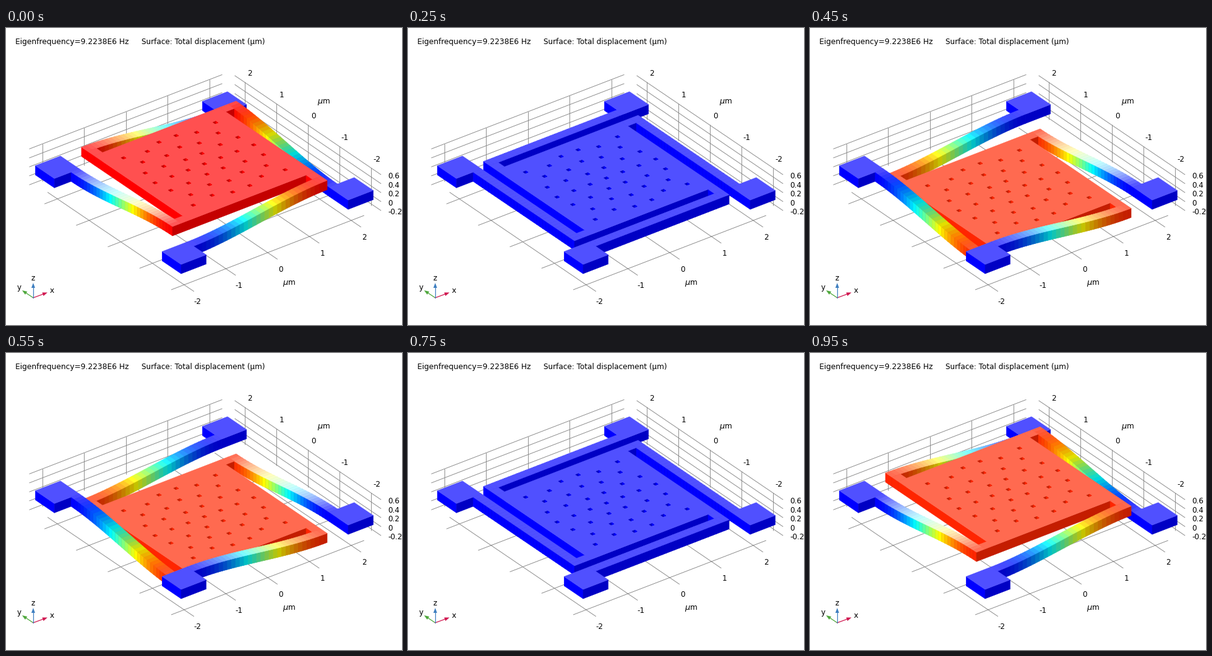
Animation, 640 px wide and 480 px high, one loop 1000 ms. Source, as a matplotlib script:

```python
import numpy as np
import matplotlib.pyplot as plt
from matplotlib.animation import FuncAnimation
from matplotlib.collections import LineCollection, PolyCollection

FRAMES, INTERVAL = 20, 50
THICK, LIFT = 15, 23          # plate thickness and peak displacement, px
TOP_Z = 0.31                  # z value of the undeformed top surface
STRIPS = 32
LOW, HIGH = -1.7, 1.5         # beam runs from its anchor to the far link

plt.rcParams["font.family"] = "DejaVu Sans"
fig = plt.figure(figsize=(6.4, 4.8), dpi=100, facecolor="white")
ax = fig.add_axes([0, 0, 1, 1])
ax.set_xlim(0, 640)
ax.set_ylim(480, 0)
ax.axis("off")


def project(x, y, up=0):
    return 320.5 + 67.5 * x - 51.2 * y, 242.5 - 26 * x - 34.7 * y - up


def label(x, y, text, size=12, **kw):
    ax.text(x, y, text, fontsize=size * 0.72, color="black", **kw)


def draw_grid():
    def segment(a, b, z_a, z_b):
        return [project(*a, 72.5 * (z_a - TOP_Z)), project(*b, 72.5 * (z_b - TOP_Z))]

    end, wall, floor = 2.31, 2.48, -0.395
    lines = []
    for k in range(-2, 3):
        z = 0.2 + 0.2 * k
        lines += [
            segment((-end, wall), (end, wall), z, z),
            segment((wall, -end), (wall, end), z, z),
            segment((k, wall), (k, wall), 0.61, -0.23),
            segment((wall, k), (wall, k), 0.61, -0.23),
            segment((-end, k), (end, k), floor, floor),
            segment((k, -end), (k, end), floor, floor),
        ]
    ax.add_collection(LineCollection(lines, colors="#858585", linewidths=0.65, zorder=1))


def draw_labels():
    label(15, 26, "Eigenfrequency=9.2238E6 Hz", 12.2)
    label(219, 26, "Surface: Total displacement (µm)")
    mid = dict(ha="center", va="center_baseline")
    for k in range(-2, 3):
        label(444 + 67.4 * k, 389 - 26 * k, str(k), **mid)
        label(496.5 - 51.2 * k, 141.5 - 34.8 * k, str(k), **mid)
        z = "0" if k == -1 else f"{0.2 + 0.2 * k:.1f}"
        label(617, 267.3 - 14.5 * k, z, va="center_baseline")
    for x, y in [(503, 122), (447, 415)]:
        label(x, y, "μ", 13, style="italic")
        label(x + 9, y, "m")


def draw_triad():
    origin = np.array([44.0, 436.0])
    for name, tip, spot, color in [("y", (26, 424), (21, 418), "#4fa83d"),
                                   ("x", (67, 427.5), (74, 423), "#d01850"),
                                   ("z", (44, 412), (44, 403), "#3f7fc0")]:
        tip = np.array(tip)
        along = (tip - origin) / np.hypot(*(tip - origin))
        side = np.array([-along[1], along[0]]) * 3
        base = tip - 8 * along
        ax.plot(*zip(origin, base), color=color, lw=0.9)
        ax.fill(*zip(tip, base + side, base - side), color=color, lw=0)
        label(*spot, name, ha="center", va="center_baseline")


def rainbow(v):
    v = 3 * abs(v)
    return np.clip([v - 1, min(v, 3 - v), 2 - v], 0, 1)


def top_shade(color, gloss):
    if gloss < 0:
        return color * (1 + gloss)
    return color + (1 - color) * min(gloss, 0.85)


class Scene:
    """Collects faces from back to front for one vibration amplitude."""

    def __init__(self, amp):
        self.amp, self.verts, self.colors = amp, [], []

    def add(self, verts, color):
        self.verts.append(verts)
        self.colors.append(color)

    def box(self, x0, x1, y0, y1, shape):
        def corner(x, y):
            return project(x, y, LIFT * self.amp * shape(x, y))

        def wall(a, b, light):
            drop = [(x, y + THICK) for x, y in (b, a)]
            self.add([a, b] + drop, light)

        xm, ym = (x0 + x1) / 2, (y0 + y1) / 2
        left, back = corner(x0, y1), corner(x1, y1)
        right, front = corner(x1, y0), corner(x0, y0)
        wall(left, front, rainbow(self.amp * shape(x0, ym)))
        wall(front, right, 0.77 * rainbow(self.amp * shape(xm, y0)))
        rise = self.amp * LIFT / 72.5
        tilt_x = rise * (shape(x0, ym) - shape(x1, ym)) / (x1 - x0)
        tilt_y = rise * (shape(xm, y0) - shape(xm, y1)) / (y1 - y0)
        gloss = 0.314 + 1.3 * tilt_x + 3.3 * tilt_y
        self.add([left, back, right, front],
                 top_shade(rainbow(self.amp * shape(xm, ym)), gloss))

    def anchor(self, sx, sy):
        x, y = 2 * sx, 2 * sy
        self.box(x - 0.3, x + 0.3, y - 0.3, y + 0.3, lambda x, y: 0)

    def solid(self, x0, x1, y0, y1):
        self.box(x0, x1, y0, y1, lambda x, y: 1)

    def beam(self, axis, sign):
        """Beam along an axis, rising in the direction given by sign."""
        def shape(x, y):
            s = (sign * (x, y)[axis] - LOW) / (HIGH - LOW)
            return s * s * (3 - 2 * s)

        cuts = np.sort(sign * np.linspace(LOW, HIGH, STRIPS + 1))[::-1]
        across = sign if axis else -sign
        near, far = sorted((1.7 * across, 1.9 * across))
        for hi, lo in zip(cuts, cuts[1:]):
            span = (near, far, lo, hi) if axis else (lo, hi, near, far)
            self.box(*span, shape)

    def hole(self, x, y, half=0.034):
        up = LIFT * self.amp
        left, back, right, front = [project(x + i * half, y + j * half, up)
                                    for i, j in [(-1, 1), (1, 1), (1, -1), (-1, -1)]]
        color = rainbow(self.amp)
        self.add([left, back, right, front], 0.77 * color)
        share = (back[0] - front[0]) / (right[0] - front[0])
        below = (back[0], front[1] + share * (right[1] - front[1]))
        self.add([back, right, below], color)


def hole_centres():
    spots = [(i, j) for i in (-1.1, 1.1) for j in (-1.1, 1.1)] + [(0, 0)]
    for radius, count in [(0.39, 6), (0.78, 12), (1.18, 18)]:
        for a in 2 * np.pi * np.arange(count) / count:
            spots.append((radius * np.cos(a), radius * np.sin(a)))
    return spots


HOLES = hole_centres()


def build(amp):
    s = Scene(amp)
    s.anchor(1, 1)
    s.beam(0, -1)
    s.solid(-1.5, -1.3, 1.5, 1.7)
    s.beam(1, 1)
    s.anchor(1, -1)
    s.solid(1.5, 1.7, 1.3, 1.5)
    s.solid(-1.5, 1.5, -1.5, 1.5)
    for x, y in HOLES:
        s.hole(x, y)
    s.solid(-1.7, -1.5, -1.5, -1.3)
    s.solid(1.3, 1.5, -1.7, -1.5)
    s.anchor(-1, 1)
    s.beam(1, -1)
    s.beam(0, 1)
    s.anchor(-1, -1)
    return s


draw_grid()
draw_labels()
draw_triad()
model = PolyCollection([], linewidths=0.4, zorder=3)
ax.add_collection(model, autolim=False)


def update(i):
    scene = build(np.cos(2 * np.pi * i / FRAMES))
    model.set_verts(scene.verts)
    model.set_facecolor(scene.colors)
    model.set_edgecolor(scene.colors)
    return [model]


anim = FuncAnimation(fig, update, frames=FRAMES, interval=INTERVAL,
                     init_func=lambda: update(0), repeat=True, repeat_delay=0)
plt.show()
```
